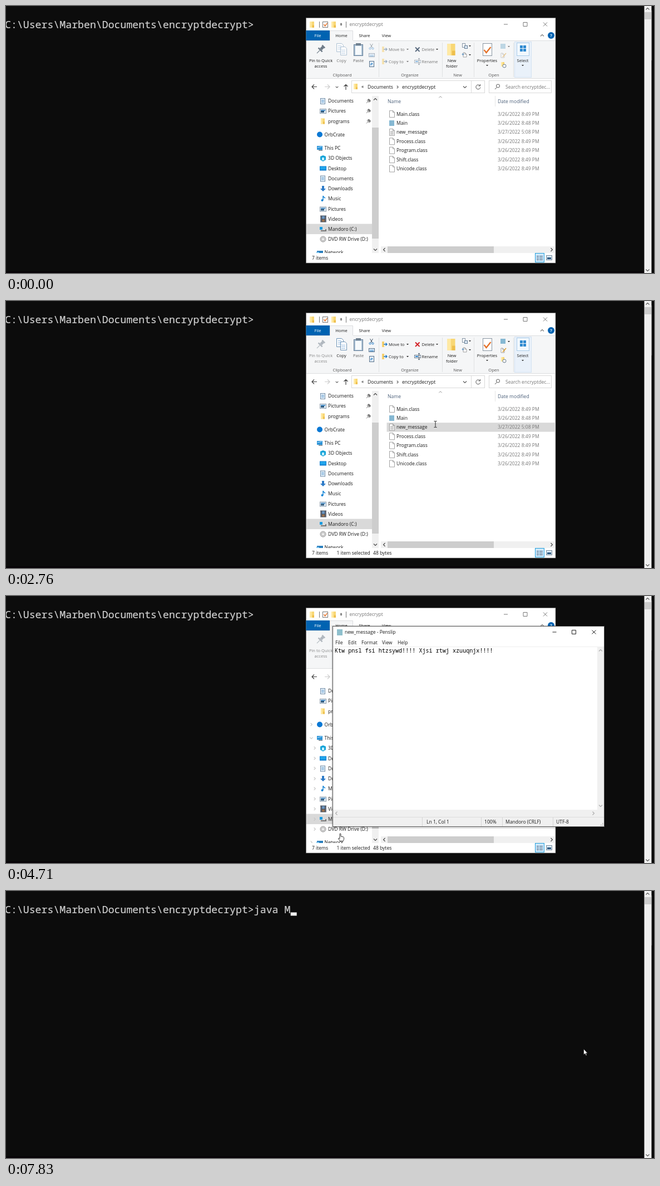
An HTML page that plays this animation: 1165 by 481 pixels, repeating every 8 s.

```html
<!DOCTYPE html>
<html lang="en">
<head>
<meta charset="utf-8">
<title>Decrypting a message</title>
<style>
html, body { margin: 0; width: 100%; height: 100%; overflow: hidden; background: #0c0c0c; }
svg { display: block; width: 1165px; height: 481px; --ink: #777; --blue: #9badc0; --red: #56677c; --dim: .5; --pin: 1; --title: #777; }
svg.picked { --ink: #222; --blue: #1f78c4; --red: #d11a20; --dim: 1; --pin: .5; }
svg.active { --title: #111; --pin: 1; }
text { font: 8.55px "Open Sans", "Noto Sans", sans-serif; fill: #1a1a1a; white-space: pre; }
.rib text { font-size: 7.55px; }
.mid { text-anchor: middle; }
.mono { font: 18.22px "Noto Sans Mono", "DejaVu Sans Mono", monospace; fill: #d0d0d0; stroke: #d0d0d0; stroke-width: .2; }
.memo { font: 10.1px "Noto Sans Mono", "DejaVu Sans Mono", monospace; fill: #000; }
.ink { fill: var(--ink); }
.dim { opacity: var(--dim); }
.pin { opacity: var(--pin); }
.grey { fill: #777; }
.head { fill: #4c607a; }
</style>
</head>
<body>
<svg id="stage" viewBox="0 0 1165 481"></svg>
<script>
const stage = document.getElementById('stage');

const text = (x, y, s, cls = '', more = '') => `<text x="${x}" y="${y + 3}" class="${cls}" ${more}>${s}</text>`;
const box = (x, y, w, h, fill, more = '') => `<rect x="${x}" y="${y}" width="${w}" height="${h}" fill="${fill}" ${more}/>`;
const line = (d, color, w = 1, fill = 'none') => `<path d="${d}" style="stroke:${color};fill:${fill}" stroke-width="${w}"/>`;
const dot = (x, y, r, fill, more = '') => `<circle cx="${x}" cy="${y}" r="${r}" fill="${fill}" ${more}/>`;
const frameBox = (x, y, w, h, fill, color) => box(x + .5, y + .5, w - 1, h - 1, fill, `stroke="${color}"`);
const group = (id, body, more = '') => `<g id="${id}" ${more}>${body}</g>`;
const chev = (x, y, dir, color = '#555', r = 3, w = 1.1) => {
  const turn = { up: 0, right: 90, down: 180, left: 270 }[dir];
  return `<path d="M${-r} ${r / 2}L0 ${-r / 2}L${r} ${r / 2}" transform="translate(${x} ${y}) rotate(${turn})" fill="none" stroke="${color}" stroke-width="${w}"/>`;
};
const tri = (x, y, color = '#333') => line(`M${x - 2} ${y - 1}h4l-2 2.2z`, 'none', 0, color);
const folder = (x, y, w = 8, h = 11) => box(x, y, w, h, '#f8d775') + box(x, y, w * .45, h, '#ffe9a3') + box(x + w * .6, y + h * .6, w * .4, h * .4, '#eebf4d');
const page = (x, y, w = 9, h = 12) => line(`M${x} ${y}h${w - 3}l3 3v${h - 3}h${-w}zM${x + w - 3} ${y}v3h3`, '#8a8a8a', .8, '#fff');
const lines = (x, y, w, n, step, color) => Array.from({ length: n }, (_, i) => box(x, y + i * step, w, .8, color)).join('');
const winButtons = (x, y, color, gap = 35.5) =>
  line(`M${x} ${y}h7M${x + gap - .5} ${y - 3.5}h7v7h-7zM${x + 2 * gap} ${y - 3.5}l7 7m0 -7l-7 7`, color);

const icons = {
  doc: (x, y) => frameBox(x - 5, y - 5, 9, 11, '#eaf3fa', '#6f8ca8') + lines(x - 3, y - 2, 5, 3, 2, '#4b8fca'),
  pic: (x, y) => frameBox(x - 6, y - 4, 12, 9, '#e6f0f8', '#8a9aaa') + box(x - 4, y - 2, 8, 2, '#4a90c9') + box(x - 4, y, 6, 3, '#315a7d'),
  folder: (x, y) => folder(x - 4, y - 5, 7, 10),
  cloud: (x, y) => dot(x, y, 5, '#0a78d4'),
  pc: (x, y) => box(x - 5, y - 4, 10, 7, '#2f95d8') + line(`M${x - 4} ${y - 1}l8 -2`, '#bfe6ff') + box(x - 2, y + 3, 7, 2, '#8b9aa5'),
  cube: (x, y) => line(`M${x - 5} ${y - 3}l5 -2l5 2v6l-5 3l-5 -3z`, 'none', 0, '#18a4d8') + box(x - 2, y - 1, 4, 5, '#c4effc'),
  screen: (x, y) => box(x - 6, y - 4, 12, 8, '#0f7fd2') + box(x - 5, y - 3, 10, 5, '#21a6ec'),
  down: (x, y) => line(`M${x - 2} ${y - 5}h4v5h3l-5 5l-5 -5h3z`, 'none', 0, '#2f7cc8'),
  note: (x, y) => line(`M${x} ${y + 3}v-8q1 3 4 4`, '#1886d6', 1.5) + dot(x - 1.5, y + 3, 2, '#1886d6'),
  film: (x, y) => box(x - 5, y - 6, 11, 12, '#3d4652') + box(x - 2, y - 5, 5, 5, '#6b95c0') + box(x - 2, y + 1, 5, 4, '#9c7350') + line(`M${x - 4} ${y - 5}v11M${x + 5} ${y - 5}v11`, '#ccd', .8),
  drive: (x, y) => box(x - 6, y - 4, 5, 5, '#1a9be0') + line(`M${x - 4} ${y + 3}h9v-3`, '#777', 2),
  disc: (x, y) => dot(x, y, 5.2, '#c9c9c9', 'stroke="#999" stroke-width=".7"') + dot(x, y, 1.6, '#fff'),
  net: (x, y) => box(x - 5, y - 3, 11, 7, '#2a7fbe') + box(x - 6, y - 1, 5, 5, '#7cc2ee')
};

const nav = [
  [171, 'doc', 'Documents'], [189, 'pic', 'Pictures'], [207.5, 'folder', 'programs'],
  [231.5, 'cloud', 'OrbCrate', 1], [256, 'pc', 'This PC', 1], [274, 'cube', '3D Objects'],
  [292.5, 'screen', 'Desktop'], [310.5, 'doc', 'Documents'], [329, 'down', 'Downloads'],
  [347, 'note', 'Music'], [365.5, 'pic', 'Pictures'], [383.5, 'film', 'Videos'],
  [402, 'drive', 'Mandoro (C:)'], [420, 'disc', 'DVD RW Drive (D:)'], [444, 'net', 'Network', 1]
];
const files = ['Main.class', 'Main', 'new_message', 'Process.class', 'Program.class', 'Shift.class', 'Unicode.class'];
const ROW = 16.4, ROW0 = 186.4;

function ribbon() {
  const smallDoc = (x, y) => page(x, y, 6, 8);
  const thumb = `<g transform="translate(566 78) rotate(45)">${box(-3.5, -8, 7, 2.5, '#6f7c88')}${box(-2.5, -6, 5, 6, '#6f7c88')}${box(-5, 0, 10, 2.5, '#6f7c88')}${box(-.6, 2, 1.2, 8, '#6f7c88')}</g>`;
  const copies = line('M594.500 67.500h9l3 3v12h-12z', '#6d93b5', 1, '#fff') + line('M601.500 73.500h8l3 3v12h-11z', '#6d93b5', 1, '#fff') +
    lines(597, 71, 6, 3, 3, '#78aadb') + lines(603, 79, 7, 3, 3, '#78aadb');
  return box(540, 62, 447, 68, '#f5f6f7') + line('M540 62.500H987M540 130.500H987', '#dcdddf') +
    box(582, 44, 42, 19, '#f5f6f7') + line('M582.500 62V44.500H623.500V62', '#dcdddf') +
    box(539.500, 44, 42.500, 18, '#0063b1') +
    text(560.5, 53, 'File', 'mid', 'style="fill:#fff"') + text(603, 53, 'Home', 'mid') +
    text(644.5, 53, 'Share', 'mid') + text(684, 53, 'View', 'mid') +
    chev(964, 53, 'up', '#777') + dot(980, 53, 6, '#0063b1') + text(980, 53, '?', 'mid', 'style="fill:#fff;font-weight:700"') +
    line('M670.500 66V128M784.500 66V128M841.500 66V128M912.500 66V128', '#dfe1e3') +
    frameBox(914, 64, 31, 65, '#e9f1fa', '#d3e2f1') +
    `<g class="pin">${thumb}${text(566, 98, 'Pin to Quick', 'mid')}${text(566, 108, 'access', 'mid')}</g>` +
    `<g class="dim">${copies}</g>` + text(603, 98, 'Copy', 'mid ink') +
    frameBox(625, 69, 17, 21, '#a9bfd3', '#667f98') + box(628, 72, 11, 16, '#f7fafc') + box(629, 67, 9, 4, '#70808f') +
    text(633.5, 98, 'Paste', 'mid', 'style="fill:#666"') +
    `<g class="dim">${line('M654.500 68l4 7M659.500 68l-4 7', '#456', 1)}${dot(654.5, 76.5, 1.6, 'none', 'stroke="#1f78c4"')}${dot(659.5, 76.5, 1.6, 'none', 'stroke="#1f78c4"')}
    ${frameBox(652, 85, 11, 7, '#e4eef7', '#57718b')}${lines(654, 88, 7, 2, 2, '#1f78c4')}</g>` +
    frameBox(653, 99, 9, 11, '#e4eef7', '#57718b') + line('M656 107v-3h3m-1.500 -1.500l1.500 1.500l-1.500 1.500', '#1f78c4') +
    [[78, 'Move to'], [100, 'Copy to']].map(([y, s]) => `<g class="dim">${box(676, y - 5, 4, 10, '#f5cf6d')}</g>` +
      line(`M679 ${y}h6m-2.500 -2.500l2.500 2.500l-2.500 2.500`, 'var(--blue)', 1.4) + text(688, y, s, 'ink') + tri(722, y, 'var(--ink)')).join('') +
    line('M736 74.500l7.500 7.500m0 -7.500l-7.500 7.500', 'var(--red)', 1.8) + text(747.5, 78, 'Delete', 'ink') + tri(775, 78) +
    `<g class="dim">${frameBox(734, 97, 12, 6, '#fff', '#678')}${box(736, 99, 5, 2, '#1f78c4')}${line('M742.500 94.500v11M741 94.500h3M741 105.500h3', '#456')}</g>` + text(747.5, 100, 'Rename', 'ink') +
    folder(793.5, 68, 14, 21) + text(801.5, 98, 'New', 'mid') + text(801.5, 108, 'folder', 'mid') +
    frameBox(820, 67, 6, 8, '#fff', '#8494a4') + frameBox(824, 71, 6, 6, '#dfeaf5', '#627c94') + tri(834, 72) +
    smallDoc(822, 84) + line('M819.500 87h4M821.500 85v4', '#4c86ba') + tri(834, 88) +
    frameBox(857, 67, 17, 23, '#fff', '#8895a1') + line('M859.500 79l4 5l8 -10', '#e3722a', 2.4) +
    text(865, 98, 'Properties', 'mid') + tri(865, 107) +
    `<g class="dim">${box(889, 68, 9, 9, '#86b8d2')}${smallDoc(890, 85)}${line('M893 92l6 -7', '#e0a030', 1.6)}</g>` + tri(904, 73, 'var(--ink)') +
    folder(890, 101, 6, 8) + dot(896, 108, 3, '#fff', 'stroke="#66788a"') +
    frameBox(918, 66, 23, 24, '#f2f8fd', '#a9cbe8') + [[924, 71], [930, 71], [924, 77], [930, 77]].map(([x, y]) => box(x, y, 5, 5, '#2f8ad0')).join('') +
    text(929, 98, 'Select', 'mid') + tri(929, 107) +
    [[604.5, 'Clipboard'], [726, 'Organize'], [812, 'New'], [877, 'Open']].map(([x, s]) => text(x, 123.5, s, 'mid', 'style="fill:#555"')).join('');
}

function explorer() {
  const navRows = nav.map(([y, kind, label, top]) => icons[kind](top ? 564 : 570, y) + text(top ? 572.5 : 579, y, label)).join('');
  const pins = nav.slice(0, 3).map(([y]) => line(`M648 ${y + 4}l3 -3m-2 -2l4 4m-3 -5l4 4l1.500 -2.500l-3 -3z`, '#7a7a7a', 1, '#7a7a7a')).join('');
  const arrows = nav.slice(3).map(([y, , label, top]) => chev(top ? 549 : 555, y, label === 'This PC' ? 'down' : 'right', '#c4c4c4', 2.6)).join('');
  const rows = files.map((name, i) => {
    const y = ROW0 + (i + .5) * ROW;
    const icon = i === 1 ? box(689, y - 5, 9, 10, '#86b8d2') : page(689.5, y - 6) + (i === 2 ? lines(691, y - 2, 6, 4, 1.8, '#999') : '');
    const date = i === 2 ? '3/27/2022 5:08 PM' : i === 1 ? '3/26/2022 8:48 PM' : '3/26/2022 8:49 PM';
    return icon + text(702, y, name) + text(884, y, date, 'grey');
  }).join('');

  return box(539.5, 21.5, 448.5, 441.5, '#fff', 'stroke="#777" stroke-width=".6"') +
    folder(546, 28) + line('M563.500 28V39M611.500 28V39', '#777') +
    frameBox(569, 28, 10, 11, '#fff', '#777') + line('M571.500 33l2 3l4 -5', '#e3722a', 1.4) + folder(585, 28) +
    tri(602.5, 34) + line('M601 31.500h3', '#333') +
    text(617.5, 33, 'encryptdecrypt', '', 'style="fill:var(--title)"') + winButtons(895, 33, 'var(--title)') +
    `<g class="rib">${ribbon()}</g>` +
    line('M559 145.500H550m4 -4l-4 4l4 4M611 151V141.500m-3.500 3.500l3.500 -3.500l3.500 3.500', '#444', 1.2) + line('M573 145.500h9m-4 -4l4 4l-4 4', '#ccc', 1.2) +
    chev(595, 146, 'down', '#666', 2.3) +
    frameBox(621, 134, 240, 23, '#fff', '#d9d9d9') + line('M836.500 134V157', '#d9d9d9') + folder(625, 140, 7, 10) +
    text(639, 145, '«') + text(650, 145.5, 'Documents') + chev(704, 146, 'right', '#555', 2.4) + text(712, 145.5, 'encryptdecrypt') +
    chev(825, 146, 'down', '#555') + line('M852 143.500a4 4 0 1 0 .8 3M852.500 141v3h-3', '#555') +
    frameBox(868, 134, 113, 23, '#fff', '#d9d9d9') + dot(884.5, 144, 3, 'none', 'stroke="#555"') + line('M882.500 146.500l-3.500 3.500', '#555') +
    text(898, 145.5, 'Search encryptdec...', 'grey') +
    box(540, 392.5, 118, 18.5, '#d9d9d9') + `<g clip-path="url(#navClip)">${navRows}${pins}${group('arrows', arrows)}</g>` +
    box(658, 162, 12, 283, '#f0f0f0') + box(658, 219, 12, 200, '#cdcdcd') + chev(664, 168, 'up', '#444') + chev(664, 439, 'down', '#444') +
    text(686, 171.5, 'Name', 'head') + text(884, 171.5, 'Date modified', 'head') + chev(781, 164, 'up', '#777', 2.6, .8) + line('M879.500 162V181', '#e5e5e5') +
    box(684.5, 0, 303, ROW, '#e5f3ff', 'id="mark"') + rows +
    box(674, 433, 313, 12, '#f0f0f0') + box(686, 433, 191, 12, '#cdcdcd') + chev(680, 439, 'left', '#444') + chev(981, 439, 'right', '#444') +
    text(550, 454, '7 items') + group('status', text(594.5, 454, '1 item selected') + text(660, 454, '48 bytes')) +
    frameBox(951, 445, 17, 17, '#cce8ff', '#26a0da') + lines(954, 450, 4, 4, 2.4, '#456') + lines(959, 450, 6, 4, 2.4, '#456') +
    frameBox(971, 449, 11, 9, '#dcebf7', '#789') + box(973, 453, 7, 3, '#26547c');
}

function editor() {
  const menu = [[592, 'File'], [615, 'Edit'], [639, 'Format'], [676, 'View'], [704, 'Help']];
  const info = [[756, 'Ln 1, Col 1'], [860, '100%'], [898, 'Mandoro (CRLF)'], [989, 'UTF-8']];
  return box(585, 53, 493, 366, '#000', 'opacity=".12"') + frameBox(587, 54, 489, 362, '#fff', '#555') +
    box(595, 60, 10, 11, '#8fc0cd') + text(609, 65, 'new_message - Penslip') + winButtons(982.5, 65, '#222') +
    menu.map(([x, s]) => text(x, 84, s)).join('') + line('M588 91.500H1063', '#eee') +
    box(1063, 91, 12, 307, '#f0f0f0') + box(588, 385, 487, 30, '#f0f0f0') + line('M588 398.500H1075', '#dcdcdc') +
    chev(1069, 98, 'up', '#aaa') + chev(1069, 378, 'down', '#aaa') + chev(594, 391.5, 'left', '#aaa') + chev(1056, 391.5, 'right', '#aaa') +
    line('M748.500 399V415M854.500 399V415M892.500 399V415M983.500 399V415', '#d5d5d5') +
    info.map(([x, s]) => text(x, 407, s)).join('') +
    [[1072, 412], [1069, 412], [1072, 409]].map(([x, y]) => box(x, y, 1.5, 1.5, '#aaa')).join('') +
    text(591, 99, 'Ktw pnsl fsi htzsywd!!!! Xjsi rtwj xzuuqnjx!!!!', 'memo') + box(591, 92, 1, 13, '#000', 'id="caret"');
}

stage.innerHTML =
  '<clipPath id="navClip"><rect x="540" y="160" width="118" height="285"/></clipPath>' +
  box(0, 0, 1165, 481, '#0c0c0c') + box(0, 478, 1148, 3, '#070407') +
  text(-2, 37, '', 'mono', 'id="prompt"') + box(0, 38.5, 11, 6, '#f2f2f2', 'id="block"') +
  box(1160, 0, 5, 481, '#050505') + box(1160, 8, 2, 90, '#2c2c2c') + box(1147.5, 0, 13, 481, '#f0f0f0') +
  box(1148, 11, 12, 13, '#cdcdcd') + chev(1153.5, 5, 'up') + chev(1153.5, 476, 'down') +
  group('explorer', explorer()) + group('editor', editor()) +
  group('mouse',
    group('arrow', line('M0 0V10.500L2.500 8.300L4.200 12L5.800 11.300L4.200 7.700H7.200Z', '#111', .8, '#fff')) +
    group('beam', line('M-2.500 -5.500h2l.5 .5l.5 -.5h2M0 -5V5M-2.500 5.500h2l.5 -.5l.5 .5h2', '#222')) +
    group('hand', line('M-1 .5q1 -1 2 0v4.500l4.500 1q1 .3 1 1.500v3l-1.500 3h-5.500l-3 -4.500q0 -1.500 2.500 0z', '#222', .9, '#fff')) +
    dot(0, 0, 9.2, '#ff0', 'id="click" opacity=".5"'));

const $ = id => document.getElementById(id);
const show = (id, on) => { $(id).style.display = on ? '' : 'none'; };
const clamp = v => Math.min(1, Math.max(0, v));

// time, x, y
const path = [
  [140, 1100, 446], [620, 772, 212], [1800, 772, 212], [1810, 771, 217], [1870, 771, 217], [1880, 772, 222],
  [4030, 772, 222], [4700, 601, 428], [4870, 601, 428], [5010, 608, 490], [5120, 600, 490],
  [5330, 490.5, 50], [5680, 490.5, 50], [6230, 1038.5, 284.5], [8000, 1038.5, 284.5]
];
const keys = [7020, 7160, 7300, 7400, 7570, 7830];

function pointer(t) {
  const i = Math.max(1, path.findIndex(p => p[0] > t));
  const [a, b] = [path[i - 1], path[i]];
  const u = clamp((t - a[0]) / (b[0] - a[0])), e = u * u * (3 - 2 * u);
  return [a[1] + (b[1] - a[1]) * e, a[2] + (b[2] - a[2]) * e];
}

function draw(now) {
  const t = now % 8000;
  const [x, y] = pointer(t);
  const picked = t >= 2290, active = picked && t < 2720, open = t < 5140;

  stage.classList.toggle('picked', picked);
  stage.classList.toggle('active', active);
  show('explorer', open);
  show('status', picked);
  $('arrows').style.opacity = clamp((t - 4450) / 230);

  const hover = x > 684 && x < 988 && t >= 140 ? Math.floor((y - ROW0) / ROW) : -1;
  const row = picked ? 2 : hover;
  show('mark', row >= 0 && row < files.length);
  $('mark').setAttribute('y', ROW0 + row * ROW);
  $('mark').setAttribute('fill', !picked ? '#e5f3ff' : active ? '#cce8ff' : '#d9d9d9');

  const grow = clamp((t - 2830) / 200), k = .92 + .08 * grow;
  show('editor', open && grow > 0);
  $('editor').style.opacity = grow;
  $('editor').setAttribute('transform', `translate(${831 * (1 - k)} ${235 * (1 - k)}) scale(${k})`);
  show('caret', t < 3240 || t >= 3770 && t < 4300);

  const hand = t >= 4640 && t < 4960;
  const beam = !hand && t >= 2720 && t < 4640 && x > 588 && y < 385;
  show('mouse', t >= 140);
  $('mouse').setAttribute('transform', `translate(${x} ${y})`);
  show('hand', hand);
  show('beam', beam);
  show('arrow', !hand && !beam);
  show('click', t >= 5330 && t < 5600);

  const typed = keys.filter(at => t >= at).length;
  $('prompt').textContent = 'C:\\Users\\Marben\\Documents\\encryptdecrypt>' + 'java M'.slice(0, typed);
  $('block').setAttribute('x', 446 + typed * 10.95);
  show('block', t >= 5910 && !(t >= 6440 && t < 6960));
}

function tick(now) {
  draw(now);
  requestAnimationFrame(tick);
}
draw(0);
requestAnimationFrame(tick);
</script>
</body>
</html>
```
